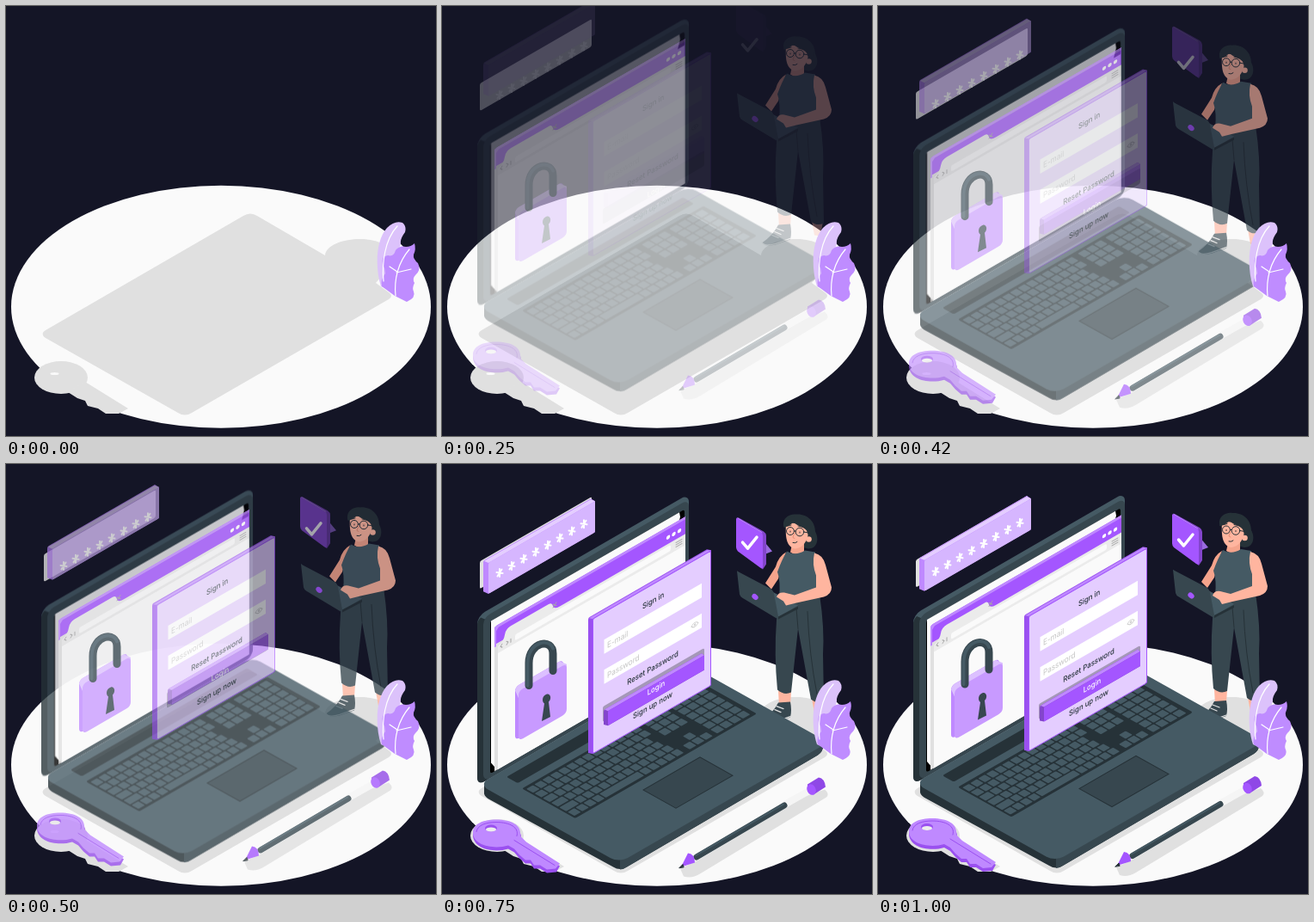
Write an HTML page that moves like this. It is 500 px wide and 500 px high and loops after 1.04 s.

```html
<!DOCTYPE html>
<html lang="en">
<head>
<meta charset="utf-8">
<title>Sign in</title>
<style>
  html, body { margin: 0; height: 100%; overflow: hidden; background: #141526; }
  svg { display: block; width: 100vw; height: 100vh; --p: 0; }
  /* Nested drops add up their travel and multiply their opacity. */
  .drop { opacity: var(--p); transform: translateY(calc((var(--p) - 1) * 30px)); }
  .wall { transform: skewY(-30deg); }
  .floor { transform: matrix(1, .56, 1, -.577, 52, 371); }
  .line { fill: none; stroke-linecap: round; stroke-linejoin: round; }
  text { font: 500 9px Inter, Roboto, sans-serif; fill: #263238; text-anchor: middle; }
  .hint { font-size: 9.4px; font-weight: 400; fill: #c4c4c4; text-anchor: start; }
</style>
</head>
<body>
<svg viewBox="0 0 500 500">
  <ellipse cx="250" cy="349.7" rx="244" ry="141" fill="#fafafa"/>
  <g id="shadows" fill="#e0e0e0">
    <path d="M46 377L276 244Q284 239 292 244L371 290C372 278 392 271 412 271C434 271 450 280 452 296L430 322L445 333Q451 337 445 341L216 473Q208 478 200 473L46 386Q39 381 46 377Z"/>
    <ellipse cx="64" cy="432" rx="31" ry="19"/>
    <path d="M92 437L142 468L131 474H116L107 468L95 465L92 459L83 456L72 449Z"/>
    <ellipse cx="56.5" cy="427.5" rx="5" ry="1.5" fill="#fafafa"/>
  </g>

  <g id="woman" class="drop">
    <path d="M391 262L406 263L405 278L392 279ZM430 271L443 272L440 289L433 288Z" fill="#ffb59f"/>
    <path d="M391 276L405 275Q407 285 405 293Q396 296 388 299Q376 302 372 297Q385 288 391 276Z" fill="#37474f"/>
    <path d="M372 296Q374 302 388 298L405 292M384 288l7 3M387 284l7 3M389 280l8 3" class="line" stroke="#e0e0e0" stroke-width="1.3"/>
    <path d="M391 150H439Q445 190 443 220L444 274Q436 278 429 272L414 190L406 264Q398 268 390 261Q386 220 389 180Z" fill="#37474f"/>
    <path d="M414 190L412 166M425 170Q427 220 436 266" class="line" stroke="#263238"/>
    <path d="M397 70C396 61 404 56 412 57C424 56 434 65 434 77C439 86 436 97 426 97L414 94Z" fill="#263238"/>
    <path d="M400 101Q391 106 388 118L376 137L383 144L391 132Q396 115 400 101ZM407 92L421 88V101Q412 106 405 101Z" fill="#f5a48c"/>
    <path d="M401 100Q411 106 422 99L434 101Q433 118 438 130V153H392Q394 135 390 124Q395 110 401 100Z" fill="#455a64"/>
    <path d="M400 70C399 84 401 96 411 97C419 96 425 89 426 78C425 68 402 64 400 70Z" fill="#ffb59f"/>
    <path d="M397 72C402 72 405 69 409 66C413 71 420 71 424 76L427 84C434 82 434 68 428 63C418 55 400 56 397 72Z" fill="#263238"/>
    <circle cx="426.5" cy="86" r="3.3" fill="#ffb59f"/>
    <g class="line" stroke="#263238">
      <circle cx="405" cy="76.5" r="4.5"/><circle cx="416" cy="77.5" r="4.8"/>
      <path d="M409.500 76.500h2M421 77.500l5 1M405 76.500v1M416 77.500v1M402 70.500l4-1M414 70.500l5 1M408 90q3 1 5-1"/>
      <path d="M410 78l-2 6 2 1" stroke="#e68f78"/>
    </g>
    <path d="M384 147L414 163L390 177L378 170Z" fill="#455a64"/>
    <path d="M433 102Q443 104 446 116L453 142Q453 150 444 153L412 160L400 163L397 158L389 153Q391 147 398 148L410 151L435 142L435 128Q430 115 433 102Z" fill="#ffb59f"/>
    <path d="M343 123Q342 122 345 124L383 144Q385 146 386 149L391 176L389 178L349 154Q347 153 346 150Z" fill="#37474f"/>
    <path d="M391 176L414 164V167L391 179Z" fill="#263238"/>
    <ellipse cx="364" cy="153" rx="4" ry="3" transform="rotate(40 364 153)" fill="#a456ff"/>
  </g>

  <g id="key" class="drop">
    <path d="M36 430C36 420 48 416 63 416C80 416 93 422 92 434L97 442L137 466L133 473L122 474L114 469L107 469L103 463L97 463L90 457L84 450L77 446C60 451 36 446 36 430Z" fill="#9a50f0"/>
    <path d="M36 427C36 417 48 412 63 412C80 412 93 418 91 431L98 438L137 463L132 469L122 470L114 465L107 465L103 459L97 459L90 453L84 446L77 442C60 447 36 442 36 427Z" fill="#bf89ff"/>
    <path d="M40 426C41 418 52 415 63 415C79 415 90 421 87 431M84 436L131 465" class="line" stroke="#9a50f0"/>
    <ellipse cx="57" cy="422" rx="7" ry="4" fill="#9a50f0"/>
    <ellipse cx="57" cy="423.5" rx="6" ry="2.5" fill="#eee"/>
  </g>

  <g id="pen" class="drop line">
    <path d="M277 469L281 478Q290 481 300 475L447 386Q451 382 445 377L424 384L296 460Z" fill="#e0e0e0"/>
    <path d="M399 394L428 378" stroke="#f5f5f5" stroke-width="8"/>
    <path d="M296 455.500L398 395.500" stroke="#37474f" stroke-width="7"/>
    <path d="M295 453.500L397 394" stroke="#455a64" stroke-width="2"/>
    <path d="M278 467L286 451Q294 452 294 462Z" fill="#a456ff"/>
    <path d="M276 468l4-4 1 3z" fill="#263238" stroke="#263238"/>
    <path d="M425 371L438 363Q445 364 446 374L432 383Q424 382 425 371Z" fill="#8f48e6"/>
    <ellipse cx="429.500" cy="377" rx="5" ry="6.500" transform="rotate(-25 429.500 377)" fill="#a456ff"/>
  </g>

  <g id="laptop" class="drop">
    <g class="wall">
      <rect x="41" y="199" width="246" height="197" rx="9" fill="#455a64"/>
      <path d="M41 208Q42 204 45 203L54 212V396H50Q41 396 41 387Z" fill="#263238"/>
      <rect x="48" y="205" width="239" height="191" rx="8" fill="#37474f"/>
      <rect x="56" y="214" width="226" height="177" rx="3" fill="#000"/>
      <path d="M57 214H276L277 220L274 230H282V391H64L57 379Z" fill="#fafafa"/>
    </g>
    <path d="M49 372V382Q50 386 56 389L199 467Q207 472 215 467L437 337Q443 333 443 327V320Z" fill="#263238"/>
    <path d="M207 456V470Q211 470 215 467L437 337Q443 333 443 327V320Z" fill="#37474f"/>
    <g class="floor">
      <rect x="-4.5" y="-4.5" width="163" height="243" rx="10" fill="#455a64"/>
      <rect x="4" y="19" width="13" height="205" rx="2" fill="#263238"/>
      <rect x="25" y="16" width="62" height="211" rx="2" fill="#263238"/>
      <g id="keys" fill="#455a64"></g>
      <rect x="98" y="84" width="38" height="66" fill="#37474f" stroke="#263238"/>
    </g>
  </g>

  <g id="window" class="drop">
    <g class="wall">
      <path d="M61 226Q61 223 64 223H283V391H61Z" fill="#e0e0e0"/>
      <rect x="65" y="255" width="218" height="136" fill="#fafafa"/>
      <path d="M61 247V226Q61 223 64 223H283V244H61Z" fill="#a456ff"/>
      <path d="M61 226Q61 223 64 223H283V226H66L63 229V247H61Z" fill="#bf89ff"/>
      <path d="M65 256V248Q72 246 73 239Q74 233 80 233H124Q128 233 129 238Q130 243 137 243H283V256Z" fill="#ebebeb"/>
      <rect x="85" y="246" width="181" height="7" rx="2" fill="#fafafa"/>
      <path d="M129 236l4 4m0-4l-4 4M70 248l-2 2 2 2M75 248l2 2-2 2M80 248v4M272 247h7M272 249.500h7M272 252h7" class="line" stroke="#a6a6a6"/>
      <g fill="#fff">
        <circle cx="263" cy="235.5" r="2.2"/><circle cx="269.5" cy="235.5" r="2.2"/><circle cx="276" cy="235.5" r="2.2"/>
      </g>
    </g>
  </g>

  <g id="lock" class="drop">
    <g class="wall">
      <rect x="85" y="307" width="56" height="62" rx="5" fill="#bf89ff"/>
      <path d="M85 311Q86 307 90 307H137L145 315V322H89Z" fill="#dcc0ff"/>
      <rect x="89" y="314" width="56" height="58" rx="5" fill="#c89aff"/>
    </g>
    <path d="M101 256V230C101 205 129 200 129 219V239" class="line" stroke="#37474f" stroke-width="9"/>
    <path d="M99.500 256V230C100 205 125 200 129 213" class="line" stroke="#455a64" stroke-width="4"/>
    <path d="M119 277L116 297.500L126 292.500L124 275C128 271 126 265 122 266C116 268 116 275 119 277Z" fill="#37474f"/>
  </g>

  <g id="password" class="drop">
    <g class="wall"><rect x="44" y="137" width="130" height="32" rx="2" fill="#e0e0e0"/></g>
    <g class="drop"><g class="wall">
      <path d="M48 139Q48 137 50 137H173L178 143V179H54L48 173Z" fill="#bf89ff"/>
      <path d="M49 138H173L178 143H54Z" fill="#e4cdff"/>
      <rect x="54" y="143" width="124" height="36" rx="2" fill="#d6b6ff"/>
    </g></g>
    <g id="stars" class="line" stroke="#fff" stroke-width="2"></g>
  </g>

  <g id="panel" class="drop"><g class="drop">
    <g class="wall">
      <path d="M170 276Q170 274 172 274H308L313 278V435H175L170 431Z" fill="#9a50f0"/>
      <path d="M171 275H308L313 278H175Z" fill="#bf89ff"/>
      <rect x="175.5" y="278.5" width="137" height="156.5" rx="2" fill="#e4cdff" stroke="#a456ff"/>
      <rect x="188.5" y="310" width="113.5" height="16.5" fill="#fff"/>
      <rect x="188.5" y="345" width="113.5" height="16.5" fill="#fff"/>
      <path d="M290 353.500q4-5 8 0q-4 5-8 0Z" fill="none" stroke="#d0d0d0"/>
      <circle cx="294" cy="353.5" r="1.3" fill="#d0d0d0"/>
      <rect x="187" y="387" width="118" height="18" rx="2" fill="#a598b8"/>
    </g>
    <g class="drop"><g class="wall">
      <path d="M188 392Q188 390 190 390H302L305 394V411H193L188 407Z" fill="#8345cc"/>
      <path d="M189 390H302L305 394H193Z" fill="#bf89ff"/>
      <rect x="193" y="394" width="112" height="17" rx="1" fill="#a456ff"/>
    </g></g>
    <g class="wall">
      <text transform="translate(245.500 300.500) scale(.866 1)">Sign in</text>
      <text class="hint" transform="translate(192 322) scale(.866 1)">E-mail</text>
      <text class="hint" transform="translate(192 357) scale(.866 1)">Password</text>
      <text transform="translate(245 378.500) scale(.866 1)">Reset Password</text>
      <text transform="translate(249 404) scale(.866 1)" style="fill:#fff">Login</text>
      <text transform="translate(245 422) scale(.866 1)">Sign up now</text>
    </g>
  </g></g>

  <g id="bubble" class="drop"><g class="drop">
    <g class="drop">
      <path d="M374 85L384 97L374 101Z" fill="#9a6be0"/>
      <path d="M342 60Q342 57 345 58L374 74Q377 76 377 79V112L373 118L344 94Q342 93 342 91Z" fill="#8345cc"/>
      <path d="M342 60Q342 58 344 59L371 75Q373 76 373 79V115Q373 118 370 116L344 97Q342 95 342 92Z" fill="#a456ff"/>
      <path d="M344 58.500L372 75" class="line" stroke="#bf89ff"/>
    </g>
    <path d="M349.500 88L355.500 95L366 82" class="line" stroke="#fff" stroke-width="3.5"/>
  </g></g>

  <g id="leaves">
    <path d="M436 326C429 304 430 272 443 258Q452 249 461 252Q466 256 464 263Q458 271 459 276L452 300L447 331Z" fill="#dcc2fb"/>
    <path d="M475 276Q477 283 474 289Q473 294 479 299Q483 307 476 313Q472 317 475 322Q472 328 474 332Q477 339 466 344L452 337L437 326Q435 319 441 311Q441 305 438 300Q436 291 444 290Q451 292 453 284Q458 278 465 280Q471 280 475 276Z" fill="#bf8cff"/>
    <path d="M453 337C451 318 456 298 469 283M454 310L471 306M446 303L455 309M439 320C437 300 440 272 455 256" class="line" stroke="#fff" stroke-width="1.2"/>
  </g>
</svg>
<script>
  const svg = document.querySelector('svg');
  const LOOP = 1040, STEPS = 25;

  // Keyboard: main block, arrow cluster and number pad in six rows.
  let keys = '';
  const addKey = (row, b, len) =>
    keys += `<rect x="${28 + row * 9.6}" y="${b}" width="8" height="${len}" rx="1"/>`;
  for (let row = 0; row < 6; row++) {
    const shift = row && row < 5 ? row * 2.3 : 0;
    if (shift) addKey(row, 18, shift + 6);
    for (let b = 18 + (shift ? shift + 7.5 : 0); b < 140; b += 9.2) {
      if (row === 5 && b > 50 && b < 100) continue;
      addKey(row, b, Math.min(7.7, 147 - b));
    }
    if (row === 5) addKey(row, 54.8, 44.5);
    for (let i = 0; i < 3; i++)
      if (row < 3 || row === 5 || (row === 4 && i === 1)) addKey(row, 152 + i * 9.5, 8);
    for (let i = 0; i < 4; i++) addKey(row, 184 + i * 10, 8.5);
  }
  document.getElementById('keys').innerHTML = keys;

  document.getElementById('stars').innerHTML = Array.from({ length: 8 }, (_, i) =>
    `<path transform="translate(${67 + i * 14} ${125 - i * 8.1})" d="M0 -4.500V4.500M-3.500 -.5L3.500 .5M-2.500 4L2.500 -4"/>`).join('');

  // cubic-bezier(.36, -.01, .5, 1.38): slow start, slight overshoot.
  const bezier = (u, a, b) => 3 * (1 - u) * u * ((1 - u) * a + u * b) + u ** 3;
  function ease(x) {
    let lo = 0, hi = 1;
    for (let i = 0; i < 24; i++) {
      const mid = (lo + hi) / 2;
      if (bezier(mid, .36, .5) < x) lo = mid; else hi = mid;
    }
    return bezier(lo, -.01, 1.38);
  }

  const start = performance.now();
  function draw(now) {
    const t = Math.max(0, now - start) % LOOP;
    const step = Math.floor(t / LOOP * STEPS + .1);
    const p = step < 2 ? 0 : ease(Math.min(1, (step + 1) / STEPS));
    svg.style.setProperty('--p', p.toFixed(4));
    requestAnimationFrame(draw);
  }
  draw(start);
</script>
</body>
</html>
```
